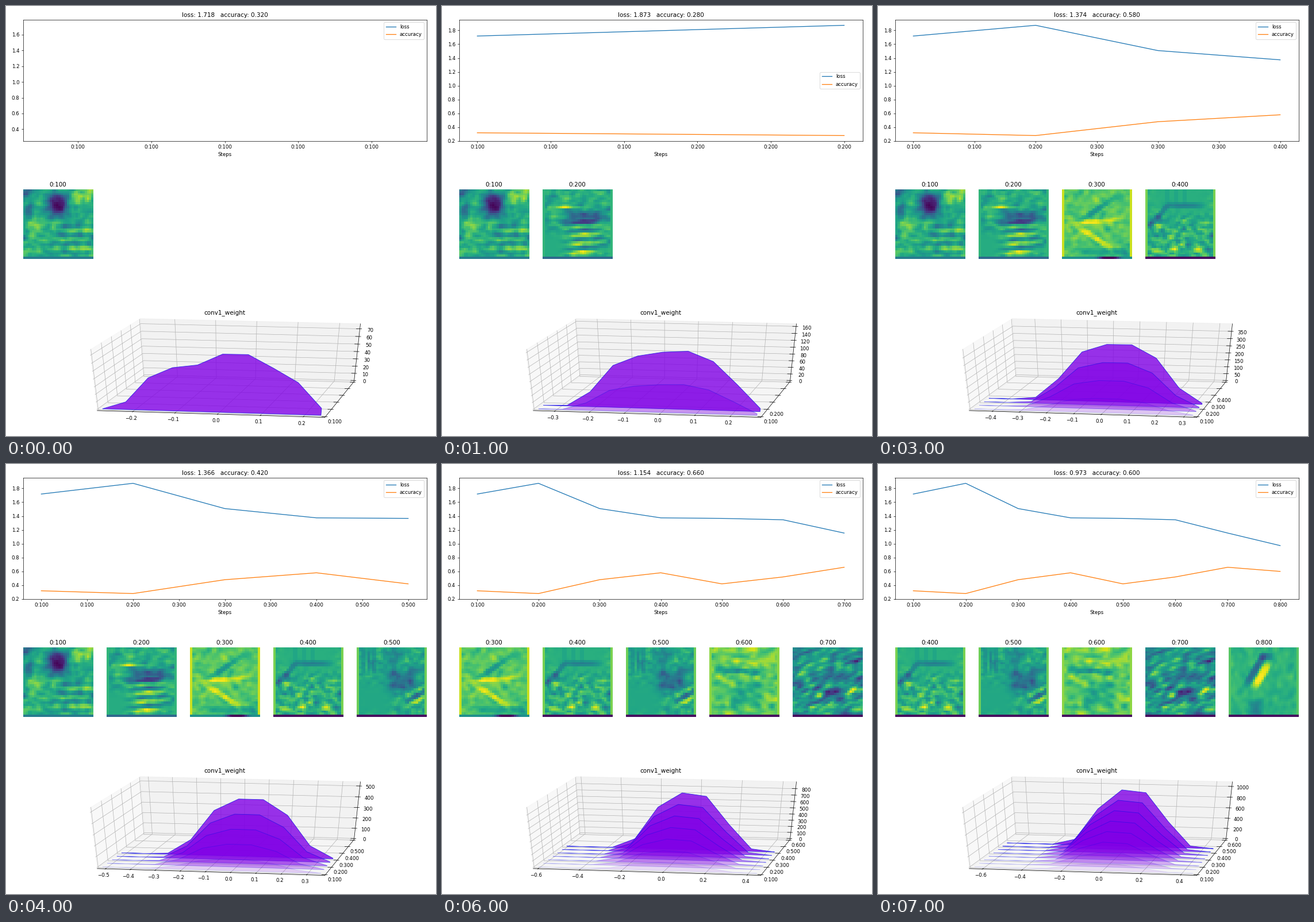
A matplotlib script for the animation above (8000 ms loop, 748 by 748 pixels).

```python
import numpy as np
import matplotlib.pyplot as plt
from matplotlib.animation import FuncAnimation
from matplotlib.ticker import MaxNLocator

SIZE, INCHES = 748, 12
LEFT, WIDTH, ROW_H = 29.5, 702, 211
GRID = 32

LOSS = [1.718, 1.873, 1.508, 1.374, 1.366, 1.346, 1.154, 0.973]
ACCURACY = [0.32, 0.28, 0.48, 0.58, 0.42, 0.52, 0.66, 0.60]

fig = plt.figure(figsize=(INCHES, INCHES), dpi=SIZE / INCHES, facecolor="white")


def add_axes(x, y, w, h):
    """Axes from a pixel box with its top left corner at x, y."""
    return fig.add_axes([x / SIZE, 1 - (y + h) / SIZE, w / SIZE, h / SIZE])


def locator():
    return MaxNLocator(9, steps=[1, 2, 2.5, 5, 10])


def step_name(i):
    return f"0:{100 * (i + 1)}"


# ---- feature maps: soft patches over smeared noise ----------------------

ROWS, COLS = np.mgrid[0:GRID, 0:GRID] + 0.5


def patch(x, y, rx, ry, amp=1.0, tilt=0):
    c, s = np.cos(np.radians(tilt)), np.sin(np.radians(tilt))
    dx, dy = COLS - x, ROWS - y
    return amp * np.exp(-((dx * c + dy * s) / rx) ** 4 - ((dy * c - dx * s) / ry) ** 4)


def bands(x, ys, rx, ry, amp, tilt=0):
    """Parallel patches of alternating sign."""
    return sum(patch(x, y, rx, ry, amp * (-1) ** k, tilt) for k, y in enumerate(ys))


def noise(seed, amp, across, down, slant=0):
    n = np.random.default_rng(seed).standard_normal((GRID, GRID))
    for shift in [(0, 1)] * across + [(1, 0)] * down + [(-1, 1)] * slant:
        n = (n + np.roll(n, shift, (0, 1))) / 2
    return amp * n / n.std()


def framed(img, side=None, bottom=0.03):
    """Even border columns and bottom row, as left by padding."""
    if side is not None:
        img[:, [0, -1]] = side
    img[-1] = bottom
    return img


MAPS = [
    framed(0.62 + noise(1, 0.06, 3, 2)
           + patch(15.5, 8, 5.5, 6, -0.32) + patch(16, 6.5, 3.5, 4, -0.22)
           + patch(1.5, 1.5, 3, 2, -0.3) + patch(2.5, 11, 2, 4, -0.18)
           + patch(27, 3, 5, 4, 0.2) + patch(5.5, 22, 4, 9, 0.1)
           + bands(23, range(17, 31, 2), 9, 1, -0.1), bottom=0.42),
    framed(0.62 + noise(2, 0.06, 4, 1) * (1 - patch(3, 26, 8, 7))
           + patch(11, 8.5, 7, 0.8, 0.28) + patch(20, 13, 9, 3.5, -0.28)
           + bands(19, range(15, 31, 2), 8, 0.9, -0.2, -5), 0.66, 0.34),
    framed(0.73 + noise(3, 0.04, 3, 2)
           + patch(14.5, 22, 9.5, 1.3, 0.22, 34) + patch(15, 15, 11, 1, 0.2, -5)
           + patch(16, 9.5, 10, 1.2, -0.2, -32) + patch(20, 29, 12, 2, -0.15),
           0.92, 0.5 + patch(21.5, 31.5, 5, 1, -0.5)[-1]),
    framed(0.63 + noise(4, 0.08, 2, 1) * (1 - patch(16, 4, 19, 9))
           + sum(patch(x, 3, 0.6, 4, -0.06) for x in (10, 14, 18))
           + patch(18, 7.6, 8.5, 1.2, -0.2) + patch(6, 12.5, 7, 1.2, -0.18, -48)
           + sum(patch(x, 28, 2.2, 1.2, 0.25) for x in (5, 12, 24)), 0.8),
    framed(0.6 + noise(5, 0.05, 2, 1) * (1 - patch(7, 24, 10, 8))
           + sum(patch(x, 7, 0.7, 5, -0.13) for x in (3, 5.5, 8))
           + patch(21, 15.5, 7, 5.5, -0.24) + patch(17, 5.5, 4, 3.5, -0.12)
           + bands(27, (20, 22.5, 25), 5, 1, 0.22, -30), 0.78),
    framed(0.77 + noise(6, 0.06, 4, 2)
           + patch(14, 11, 9, 1.3, -0.25, 5) + patch(16, 22, 9, 7, -0.14), 0.83),
    framed(0.55 + noise(7, 0.12, 4, 0, 2)
           + patch(17, 21, 7, 1.6, -0.35, -25) + bands(12, (19, 22), 3, 0.9, -0.3, -15)),
    framed(0.65 + noise(8, 0.025, 2, 4)
           + patch(12, 10.5, 8, 1.5, -0.28, -60) + patch(15, 13, 6.5, 1.8, 0.35, -60)
           + patch(17, 4.5, 3, 1.5, -0.25) + patch(12.5, 28, 3, 4, -0.2), 0.74),
]


def draw_maps(n):
    side = WIDTH / 5.8
    for col, i in enumerate(range(max(0, n - 5), n)):
        ax = add_axes(LEFT + col * side * 1.2, 318.7, side, side)
        ax.imshow(MAPS[i], cmap="viridis", vmin=0, vmax=1, interpolation="nearest")
        ax.set_title(step_name(i))
        ax.axis("off")


# ---- line chart ---------------------------------------------------------

def draw_lines(n):
    ax = add_axes(LEFT, 24, WIDTH, ROW_H)
    steps = [100 * (i + 1) for i in range(n)]
    ax.plot(steps, LOSS[:n], label="loss")
    ax.plot(steps, ACCURACY[:n], label="accuracy")
    ax.set_ylim(np.floor(ax.get_ylim()[0] * 100) / 100)
    ax.xaxis.set_major_locator(locator())
    ax.xaxis.set_major_formatter(lambda v, _: step_name(round(v / 100 - 1)))
    ax.set_title(f"loss: {LOSS[n - 1]:.3f}   accuracy: {ACCURACY[n - 1]:.3f}")
    ax.set_xlabel("Steps")
    ax.legend(loc="best")


# ---- stacked histograms in perspective ----------------------------------

AZIM, ELEV, EYE_DIST = np.radians(-80), np.radians(30), 10
EYE = np.array([np.cos(ELEV) * np.cos(AZIM), np.cos(ELEV) * np.sin(AZIM), np.sin(ELEV)])
RIGHT = np.array([-np.sin(AZIM), np.cos(AZIM), 0])
UP = np.cross(EYE, RIGHT)
SCALE_X, SCALE_Y = WIDTH / 0.185, ROW_H / 0.185
LO, HI = -1 / 48, 1 + 1 / 48
TICK_OUT, TICK_IN, LABEL_GAP = 1 / 120, 1 / 60, 0.0436
DEPTH = 10  # histograms that fit along the depth axis
WEIGHTS_PER_STEP = 430


def weight_range(i):
    keys = [0, 2, 4, 5, 7]
    return (np.interp(i, keys, [-0.274, -0.424, -0.515, -0.558, -0.645]),
            np.interp(i, keys, [0.239, 0.307, 0.353, 0.428, 0.457]))


def bin_heights(i):
    """A flat-topped bell that sharpens with training; an early bump fades."""
    x = np.linspace(*weight_range(i), 10)
    bell = 0.5 ** (np.abs((x - 0.01) / 0.195) ** (3 + 3 * np.exp(-0.6 * i)))
    bump = 0.27 * np.exp(-0.9 * i)
    h = (1 - bump) * bell + bump * np.exp(-((x - 0.04) / 0.06) ** 2)
    return h / h.max()


def project(x, y, z):
    """Unit cube coordinates to stage pixels."""
    p = np.stack(np.broadcast_arrays(x, y, z)).astype(float) - 0.5
    d = EYE_DIST - EYE @ p
    return 390 + SCALE_X * (RIGHT @ p) / d, 627.5 - SCALE_Y * (UP @ p) / d


def ticks_in(lo, hi):
    return [v for v in locator().tick_values(lo, hi) if lo <= v <= hi]


def draw_hist(n):
    ax = add_axes(0, 0, SIZE, SIZE)
    ax.set(xlim=(0, SIZE), ylim=(SIZE, 0))
    ax.axis("off")

    def line(x, y, z, color="black"):
        ax.plot(*project(x, y, z), color=color, lw=0.8)

    def pane(x, y, z, grey):
        shade = (grey, grey, grey, 0.5)
        ax.fill(*project(x, y, z), facecolor=shade, edgecolor=shade, lw=1)

    def label(x, y, z, text):
        px, py = project(x, y, z)
        ax.text(px, py, text, ha="center", va="top", fontsize=10)

    around, across = [LO, HI, HI, LO], [LO, LO, HI, HI]
    pane(LO, around, across, 0.95)
    pane(around, HI, across, 0.9)
    pane(around, across, LO, 0.925)

    bins = bin_heights(n - 1)
    lo, hi = weight_range(n - 1)
    top = WEIGHTS_PER_STEP * n / bins.sum()
    x_ticks = [((v - lo) / (hi - lo), f"{round(v, 1) + 0.0:.1f}".replace("-", "\u2212"))
               for v in ticks_in(lo, hi)]
    y_ticks = [(i / 5, step_name(i) if i < n else "") for i in range(6)]
    z_ticks = [(v / top, f"{v:.0f}") for v in ticks_in(0, top)]

    grid = "#b0b0b0"
    for t, _ in x_ticks:
        line(t, [LO, HI, HI], [LO, LO, HI], grid)
    for t, _ in y_ticks:
        line([LO, LO, HI], t, [HI, LO, LO], grid)
    for t, _ in z_ticks:
        line([LO, LO, HI], [LO, HI, HI], t, grid)

    line([LO, HI], LO, LO)
    line(HI, [LO, HI], LO)
    line(HI, HI, [LO, HI])

    near, far = LO - LABEL_GAP, HI + LABEL_GAP
    beyond = [HI + TICK_OUT, HI - TICK_IN]
    for t, text in x_ticks:
        line(t, [LO - TICK_OUT, LO + TICK_IN], LO)
        label(t, near, near, text)
    for t, text in y_ticks:
        line(beyond, t, LO)
        label(far, t, near, text)
    for t, text in z_ticks:
        line(beyond, HI, t)
        label(far, far, t, text)

    # Farthest first; each nearer sheet holds fewer steps and is paler
    xs = np.concatenate([[0], np.linspace(0, 1, len(bins)), [1]])
    for i in reversed(range(n)):
        share = (i + 1) / n
        zs = np.concatenate([[0], bins * share, [0]])
        ax.fill(*project(xs, i / DEPTH, zs), lw=1, zorder=3,
                facecolor=(0.5, 0, 0.9, 0.8 * share),
                edgecolor=(0.05, 0.05, 0.9, 0.8 * share))

    ax.text(LEFT + WIDTH / 2, 536.5, "conv1_weight", ha="center", va="baseline", fontsize=12)


def draw(frame):
    fig.clear()
    n = frame + 1
    draw_hist(n)
    draw_lines(n)
    draw_maps(n)
    return []


anim = FuncAnimation(fig, draw, frames=len(LOSS), interval=1000, repeat=True,
                     repeat_delay=0, init_func=lambda: [])
plt.show()
```
